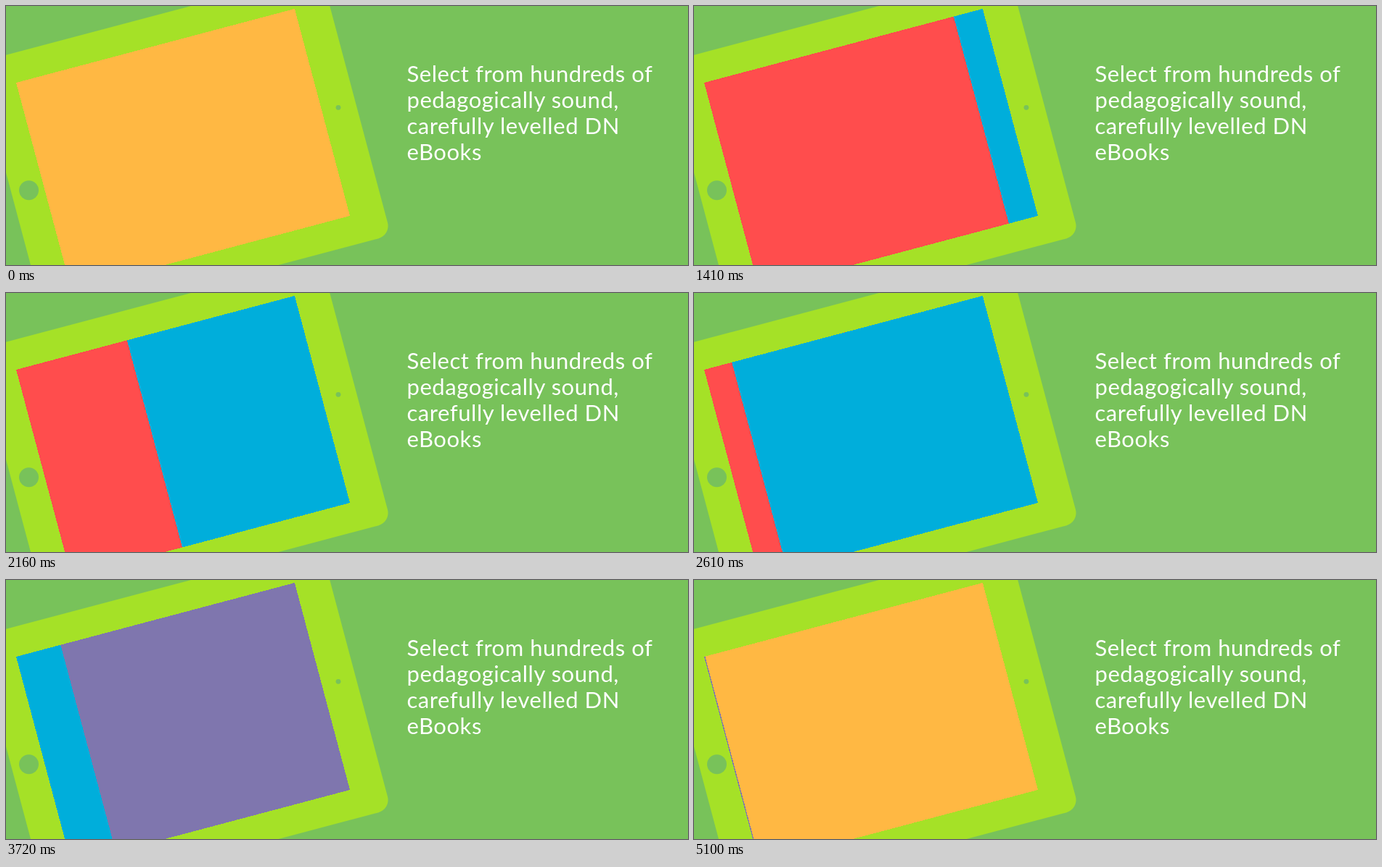
Animation, 940 px wide and 358 px high, one loop 5.17 s. Source, as an HTML page:

```html
<!DOCTYPE html>
<html lang="en">
<head>
<meta charset="utf-8">
<title>Select from hundreds of eBooks</title>
<style>
  /* Clock in milliseconds; everything else is derived from it. */
  @property --t {
    syntax: "<number>";
    inherits: true;
    initial-value: 0;
  }

  :root {
    --ground: #78c25a;
    --case: #a5e127;
    --orange: #ffb843;
    --red: #ff4d4d;
    --blue: #00aedb;
    --purple: #7f76ae;
  }

  html, body {
    margin: 0;
    width: 100%;
    height: 100%;
    overflow: hidden;
    background: var(--ground);
  }

  svg {
    display: block;
    width: 940px;
    height: 358px;
    animation: clock 5170ms infinite;
  }

  @keyframes clock {
    0% { --t: 0; animation-timing-function: steps(170); }
    98.6461%, 100% { --t: 5100; }
  }

  .case { fill: var(--case); }
  .hole { fill: var(--ground); }
  .base { fill: var(--orange); }

  /* Hard edges keep lower pages from showing around the top one. */
  .base, .page { shape-rendering: crispEdges; }

  /* Each page wipes in from the right edge of the screen. */
  .page {
    transform-box: fill-box;
    transform-origin: 100% 50%;
    transform: scaleX(clamp(0, (var(--t) - var(--start)) / var(--span), 1));
  }
  .red    { fill: var(--red);    --start: 80;   --span: 1093; }
  .blue   { fill: var(--blue);   --start: 1253; --span: 1507; }
  .purple { fill: var(--purple); --start: 2767; --span: 1134; }
  .orange { fill: var(--orange); --start: 3906; --span: 1198; }

  text {
    fill: #fff;
    font: 400 31px Lato, "Open Sans", sans-serif;
    letter-spacing: 0.55px;
  }
</style>
</head>
<body>
<svg viewBox="0 0 940 358">
  <g transform="translate(14 106) rotate(-14.9)">
    <rect class="case" x="-45.5" y="-40.5" width="490.5" height="377" rx="18"/>
    <rect class="base" width="397.2" height="296.2"/>
    <rect class="page red" width="397.2" height="296.2"/>
    <rect class="page blue" width="397.2" height="296.2"/>
    <rect class="page purple" width="397.2" height="296.2"/>
    <rect class="page orange" width="397.2" height="296.2"/>
  </g>
  <circle class="hole" cx="31.5" cy="254.7" r="13.5"/>
  <circle class="hole" cx="458" cy="140.3" r="3.4"/>
  <text>
    <tspan x="552.5" y="105">Select from hundreds of</tspan>
    <tspan x="552.5" y="141">pedagogically sound,</tspan>
    <tspan x="552.5" y="177">carefully levelled DN</tspan>
    <tspan x="552.5" y="213">eBooks</tspan>
  </text>
</svg>
</body>
</html>
```
